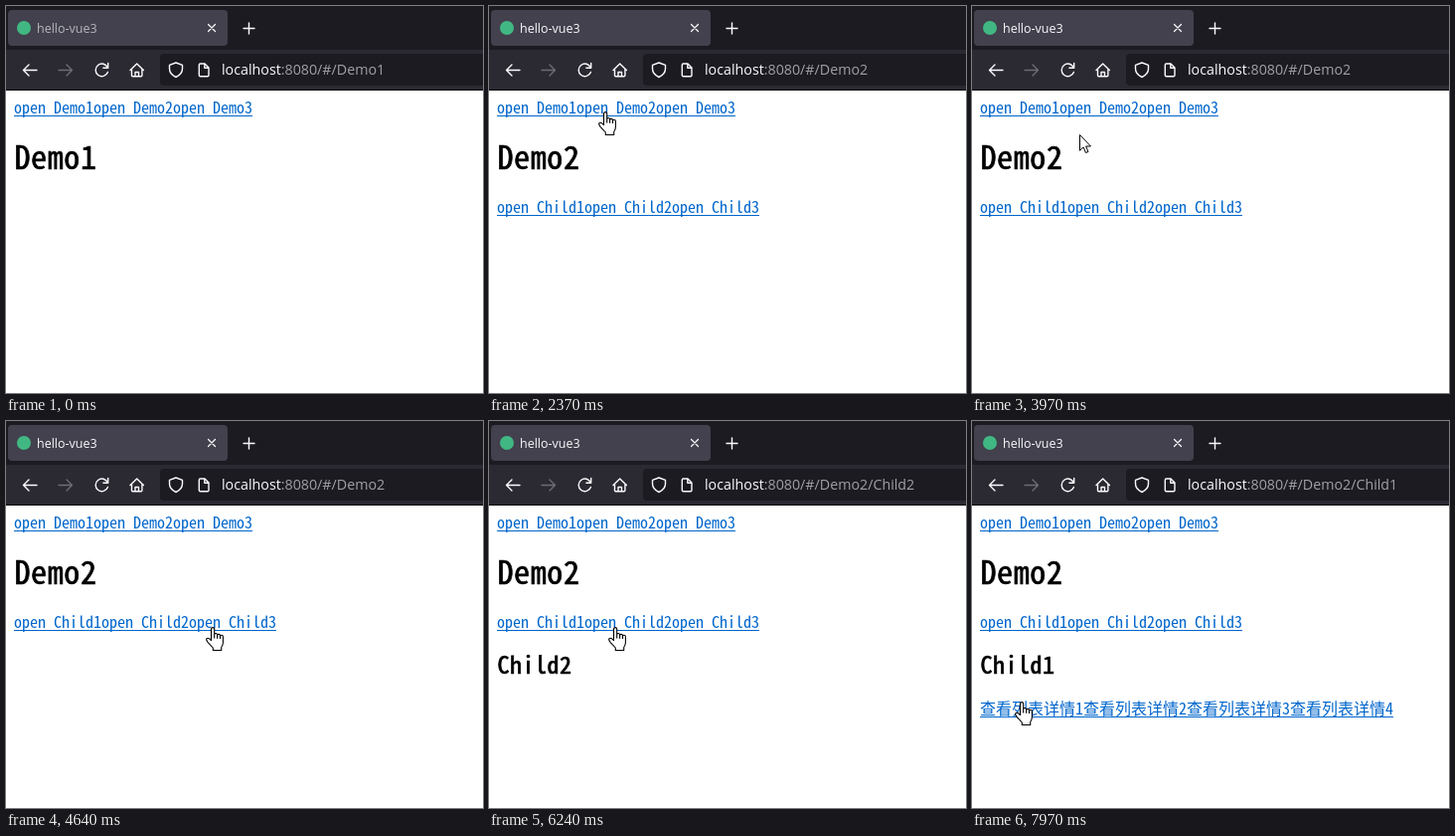
Write an HTML page that moves like this. It is 480 by 389 pixels and loops after 8000 ms.

```html
<!DOCTYPE html>
<html lang="en">
<head>
<meta charset="utf-8">
<title>hello-vue3</title>
<style>
  html, body { margin: 0; width: 100%; height: 100%; overflow: hidden; background: #fff; }
  svg { display: block; width: 480px; height: 389px; }
  .ui { font-family: "Open Sans", "Noto Sans", sans-serif; }
  .page { font-family: "Noto Sans Mono CJK SC", "Liberation Mono", monospace; }
  .link { fill: #0066cc; }
  .head { stroke: #000; stroke-width: .7; }
  .icon { fill: none; stroke: #fbfbfe; stroke-width: 1.4; stroke-linecap: round; stroke-linejoin: round; }
  .cursor { fill: #fff; stroke: #000; stroke-linejoin: round; }
</style>
</head>
<body>
<svg viewBox="0 0 480 389">
  <rect width="480" height="389" fill="#fff"/>
  <rect width="480" height="44" fill="#1c1b22"/>
  <rect y="44" width="480" height="40" fill="#2b2a33"/>
  <rect y="84" width="480" height="1" fill="#0c0c0d"/>
  <rect x="2" y="4" width="221" height="36" rx="4" fill="#42414d"/>
  <rect x="155" y="48" width="340" height="32" rx="4" fill="#1c1b22"/>
  <circle cx="18" cy="22" r="7" fill="#41b883"/>

  <g class="icon">
    <path d="M203.5 18.5l7 7m0-7l-7 7" stroke-width="1.2"/>
    <path d="M239 22.5h11m-5.5-5.5v11"/>
    <path d="M31 64.5H17.5m5.5-5.5l-5.5 5.5 5.5 5.5"/>
    <path d="M53 64.5H66.5m-5.5-5.5l5.5 5.5-5.5 5.5" stroke="#6d6c75"/>
    <path d="M102.3 62a6.3 6.3 0 1 0 .1 4.5M102.7 57.5v4.8h-4.8"/>
    <path d="M125 64.5l6.7-6.5 6.7 6.5M126.5 63.5v6.2q0 1 1 1h8.4q1 0 1-1v-6.2M130 70.5v-4h3.5v4"/>
    <path d="M171 57l6.5 2.4v3.6q0 5.5-6.5 8.5-6.5-3-6.5-8.5v-3.6z"/>
    <path d="M195.5 58h4.5l4 4v7.5q0 1.2-1.2 1.2h-7.3q-1.2 0-1.2-1.2v-10.3q0-1.2 1.2-1.2zM199.8 58.3v3.9h3.9"/>
  </g>

  <g class="ui">
    <text id="title" x="31" y="27" font-size="12.5">hello-vue3</text>
    <text x="217" y="69" font-size="14.25" fill="#fbfbfe">localhost<tspan id="url" fill="#a0a0a6"></tspan></text>
  </g>

  <g class="page">
    <g class="link">
      <text class="half" x="8" y="108" data-size="16">open Demo1open Demo2open Demo3</text>
      <rect x="8" y="110" width="240" height="1"/>
    </g>
    <text id="demo" class="half head" x="8.5" y="164" data-size="32" letter-spacing=".6"></text>
    <g id="children" class="link">
      <text class="half" x="8" y="208" data-size="16">open Child1open Child2open Child3</text>
      <rect x="8" y="210" width="264" height="1"/>
    </g>
    <text id="child" class="half head" x="8.5" y="254" data-size="24" letter-spacing=".5"></text>
    <g id="list" class="link">
      <text x="8" y="295" font-size="16">查看列表详情1查看列表详情2查看列表详情3查看列表详情4</text>
      <rect x="8" y="297" width="416" height="1"/>
    </g>
  </g>

  <g id="cursor" class="cursor">
    <path id="arrow" d="M.5.5v15.8l3.6-3.4 2.4 5.6 2.5-1-2.4-5.5h4.9z"/>
    <path id="hand" transform="translate(-6 0)" stroke-width="1.1"
      d="M5.5 13.5V2.2a1.6 1.6 0 0 1 3.2 0v5.3a1.5 1.5 0 0 1 2.9.3v.6a1.5 1.5 0 0 1 2.9.3v.8a1.45 1.45 0 0 1 2.9.3v5.7q0 3-1.7 5v3H7.3v-2.5L2 15.3Q0 12.5 1 11.6q1.5-1.3 4.5 1.9zM8.7 7.5v4M11.6 8v3.8M14.5 9v3"/>
    <path id="beam" fill="none" d="M-3-8h2.5l.5.5.5-.5H3M0-7.5v15M-3 8h2.5l.5-.5.5.5H3"/>
  </g>
</svg>
<script>
const LOOP = 8000, STEP = 200 / 3, ENTER = 500, FOCUS = 2033;
const $ = id => document.getElementById(id);
const show = (id, on) => $(id).setAttribute("visibility", on ? "inherit" : "hidden");

const linear = u => u;
const out = u => u * (2 - u);
const smooth = u => u * u * (3 - 2 * u);

const routes = [
  [0, "Demo1"], [2033, "Demo2"], [2900, "Demo3"], [3833, "Demo2"],
  [5100, "Demo2/Child3"], [5967, "Demo2/Child2"], [6767, "Demo2/Child1"]
];

// Pointer hotspot: time, x, y, easing used on the way there
const keys = [
  [500, 458, 297], [1300, 47, 107, out], [1367, 47, 106], [1500, 47, 106],
  [1700, 113, 106], [2033, 113, 106], [2367, 116, 106], [2700, 168, 107],
  [2900, 168, 107], [2967, 169, 107], [3300, 169, 107], [3367, 168, 107],
  [3767, 115, 107], [3833, 115, 107], [4167, 94, 170], [4633, 207, 207, linear],
  [4800, 260, 207, out], [4967, 207, 207], [5300, 207, 207], [5833, 130, 207],
  [6167, 130, 207], [6633, 55, 199], [7367, 55, 199], [7967, 49, 282]
];

function pointerAt(t) {
  const i = keys.findIndex(k => k[0] >= t);
  if (i < 0) return keys[keys.length - 1].slice(1, 3);
  if (i === 0) return keys[0].slice(1, 3);
  const a = keys[i - 1], b = keys[i];
  const u = (b[3] || smooth)((t - a[0]) / (b[0] - a[0]));
  return [1, 2].map(n => Math.round(a[n] + (b[n] - a[n]) * u));
}

// Half-em Latin letters, whichever page font is installed
function sizeText() {
  const ctx = document.createElement("canvas").getContext("2d");
  ctx.font = "100px " + getComputedStyle(document.querySelector(".page")).fontFamily;
  const ratio = 50 / ctx.measureText("o").width;
  document.querySelectorAll(".half").forEach(el =>
    el.setAttribute("font-size", el.dataset.size * ratio));
}

function draw(time) {
  const t = Math.max(0, ENTER + Math.floor((time - ENTER) / STEP + 0.01) * STEP);
  const route = routes.filter(r => r[0] <= t + 1).pop()[1];
  const [demo, child = ""] = route.split("/");
  const nested = demo === "Demo2", listed = child === "Child1";

  $("url").textContent = ":8080/#/" + route;
  $("title").setAttribute("fill", t + 1 < FOCUS ? "#b8b8be" : "#fbfbfe");
  $("demo").textContent = demo;
  $("child").textContent = child;
  show("children", nested);
  show("list", listed);

  const [x, y] = pointerAt(t);
  const within = (top, bottom, right) => y >= top && y < bottom && x >= 8 && x < right;
  const hand = within(95, 112, 248) || nested && within(195, 212, 272) || listed && within(281, 298, 424);
  const beam = within(136, 169, 90) || child && within(235, 258, 82);
  show("cursor", t >= ENTER - 1);
  show("hand", hand);
  show("beam", beam && !hand);
  show("arrow", !hand && !beam);
  $("cursor").setAttribute("transform", `translate(${x} ${y})`);
}

sizeText();
const start = performance.now();
function frame() {
  draw((performance.now() - start) % LOOP);
  requestAnimationFrame(frame);
}
frame();
</script>
</body>
</html>
```
